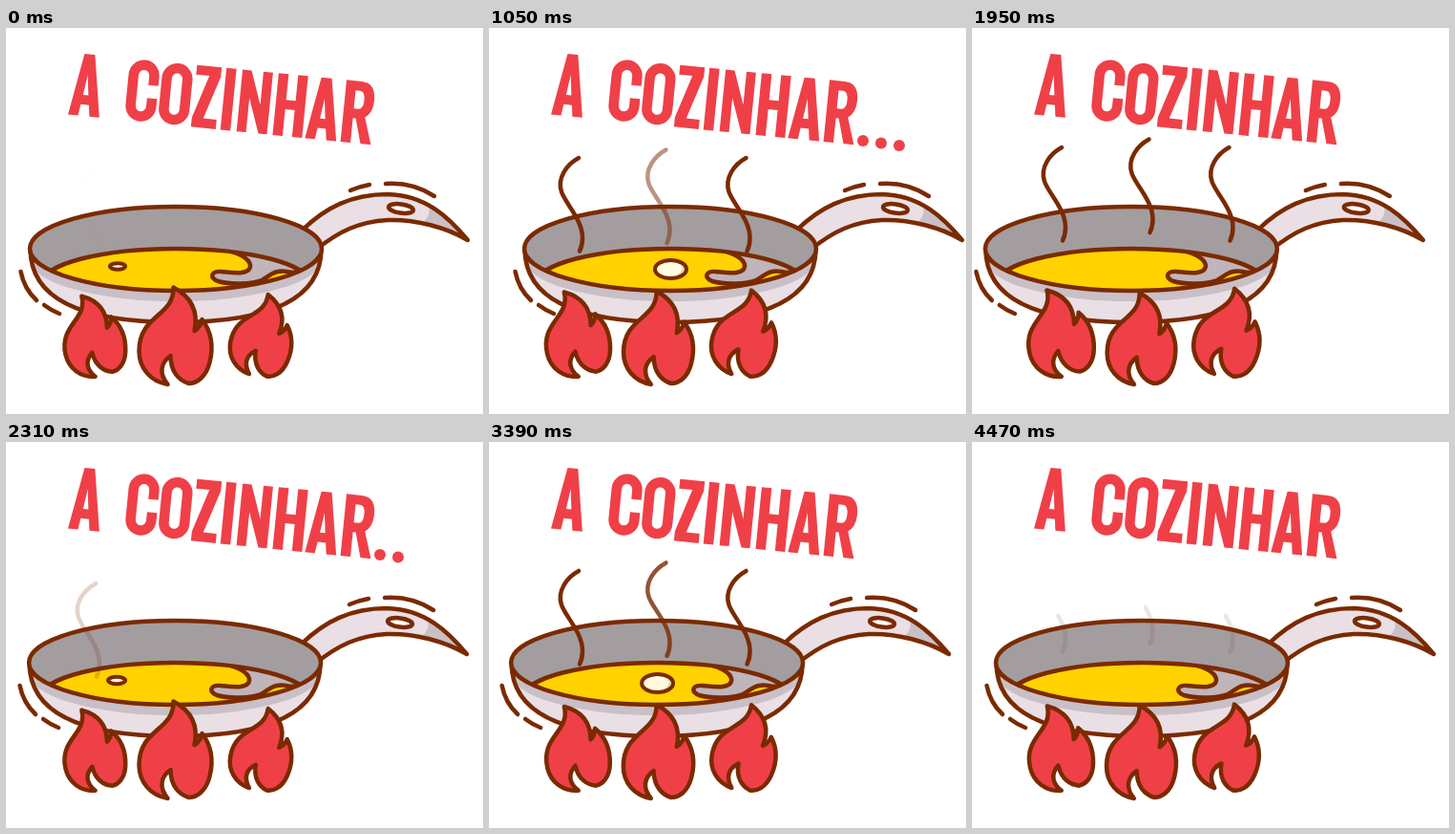
An HTML page for the animation above (4500 ms loop, 500 px wide and 404 px high).

```html
<!DOCTYPE html>
<html lang="pt">
<head>
<meta charset="utf-8">
<title>A cozinhar...</title>
<style>
html, body { margin: 0; width: 100%; height: 100%; overflow: hidden; background: #fff; }
svg { display: block; width: 100%; height: 100%; }
.line { stroke: #7b2a00; stroke-width: 4.5; stroke-linecap: round; stroke-linejoin: round; }
.none { fill: none; }
.red { fill: #ef4048; }
.light { fill: #e9dfe5; }
.shade { fill: #c9bfc6; }
.grey { fill: #a39da0; }
.pale { fill: #bfb5bb; }
.oil { fill: #ffd200; }
.stroke { fill: none; stroke: #ef4048; stroke-width: 10.5; }
</style>
</head>
<body>
<svg viewBox="0 0 500 404" role="img" aria-label="A COZINHAR...">
  <defs>
    <clipPath id="rim"><ellipse cx="178" cy="231" rx="153" ry="44"/></clipPath>
    <clipPath id="floor"><ellipse cx="178" cy="267" rx="140" ry="36"/></clipPath>
    <path id="bodyShape" d="M25.5 231C25.5 291 95 308 178 308S330.500 291 330.500 231Z"/>
    <clipPath id="body"><use href="#bodyShape"/></clipPath>
    <path id="handleShape" d="M311 211C335 188 362 174 400 174C440 175 464 198 484 222C462 209 430 200 400 201C370 203 350 212 325 232Z"/>
    <clipPath id="handle"><use href="#handleShape"/></clipPath>
  </defs>

  <!-- lettering -->
  <g class="red" fill-rule="evenodd" transform="translate(65 90.500) rotate(5.700)">
    <path id="capA" d="M0 0L11 -65H22L33 0H22.5L20.8 -12H12.2L10.5 0ZM13.7 -22H19.3L16.5 -43Z"/>
    <path class="stroke" transform="translate(59)" d="M27 -39V-48.5a10.85 11 0 0 0 -21.7 0V-16.5a10.85 11 0 0 0 21.7 0V-25.500"/>
    <path class="stroke" transform="translate(94)" d="M5.3 -48.5a10.85 11 0 0 1 21.7 0V-16.5a10.85 11 0 0 1 -21.7 0Z"/>
    <path transform="translate(129.5)" d="M0 -65H26V-55L12 -10H26V0H0V-10L14 -55H0Z"/>
    <path transform="translate(160.5)" d="M0 0V-65H10.5V0Z"/>
    <path transform="translate(177.5)" d="M0 0V-65H9.5L22 -30V-65H32V0H23L10 -36V0Z"/>
    <path transform="translate(215.5)" d="M0 0V-65H10.5V-38H20.5V-65H31V0H20.5V-28H10.5V0Z"/>
    <use href="#capA" x="249.5"/>
    <path transform="translate(287)" d="M0 0V-65H16Q31 -65 31 -46Q31 -33 23 -28L32 0H21L13.5 -26H10.5V0ZM10.5 -55V-36H15Q20.5 -36 20.5 -45.5T15 -55Z"/>
  </g>
  <g id="dots" class="red">
    <circle cx="392" cy="118" r="6"/>
    <circle cx="411" cy="120.5" r="6"/>
    <circle cx="430" cy="123" r="6"/>
  </g>

  <g id="pan">
    <path class="line none" d="M361 170Q370 166 381 164M398 163Q426 161 449 176M15.5 255Q19 273 32 285M40 290Q48 296 56 299"/>
    <use href="#handleShape" class="light"/>
    <path class="shade" clip-path="url(#handle)" d="M428 172Q456 190 434 206L490 230V180Z"/>
    <use href="#handleShape" class="line none"/>
    <ellipse class="line" fill="#fff" cx="414" cy="189" rx="13" ry="4.6" transform="rotate(8 414 189)"/>
    <use href="#bodyShape" class="light"/>
    <ellipse class="shade" cx="178" cy="242" rx="153" ry="44" clip-path="url(#body)"/>
    <use href="#bodyShape" class="line none"/>
    <ellipse class="grey" cx="178" cy="231" rx="153" ry="44"/>
    <g clip-path="url(#rim)">
      <g clip-path="url(#floor)">
        <rect class="oil" x="20" y="225" width="320" height="60"/>
        <path class="line pale" d="M222 230C240 234 257 240 256 250C254 259 236 256 226 255C215 254 213 261 222 265C236 269 258 268 268 264C277 260 280 251 300 256L345 250L310 220Z"/>
      </g>
      <ellipse class="line none" cx="178" cy="267" rx="140" ry="36"/>
    </g>
    <g id="bubbles"></g>
    <ellipse class="line none" cx="178" cy="231" rx="153" ry="44"/>
  </g>
  <g id="steam"></g>
  <g id="flames"></g>
</svg>
<script>
const LOOP = 4500, PUFF = 2250, DOTS = 1500;
const $ = id => document.getElementById(id);
const clamp = x => Math.min(1, Math.max(0, x));
const ramp = (t, a, b) => clamp((t - a) / (b - a));
const ease = u => u * u * (3 - 2 * u);
const mix = (a, b, u) => a + (b - a) * u;

function add(parent, tag, attrs) {
  const el = document.createElementNS("http://www.w3.org/2000/svg", tag);
  set(el, attrs);
  return parent.appendChild(el);
}
function set(el, attrs) {
  for (const k in attrs) el.setAttribute(k, attrs[k]);
}
function track(t, keys) {
  let i = 1;
  while (i < keys.length - 1 && t > keys[i][0]) i++;
  const [a, va] = keys[i - 1], [b, vb] = keys[i];
  return mix(va, vb, ease(ramp(t, a, b)));
}

const sway = [[0, 0], [300, 0], [1000, 12], [1372, 12], [1838, -12],
  [2838, 12], [3137, 12], [3603, -12.5], [4080, 0], [4500, 0]];
const flicker = [0, 296, 592, 864, 1192, 1480, 1817, 2064, 2310, 2595,
  2880, 3190, 3520, 3840, 4080, 4300, 4600].map((t, i) => [t, i % 2]);

const flameShape = "M-2 -50.5C14 -42 25 -28 20 -5C25 -8 27 -12 28 -17C38 -4 40 12 36 28" +
  "C32 44 22 50 14 50C4 47 -5 38 -5 21C-16 29 -17 40 -8 51" +
  "C-26 48 -38 34 -38 16C-38 -22 -1 -20 -2 -50.5Z";
const flames = [
  { x: 90.5, y: 364, tilt: -13, from: .84, to: .95 },
  { x: 177.5, y: 372.5, tilt: 0, from: 1, to: .9 },
  { x: 269, y: 363.5, tilt: 10, from: .84, to: .95 }
].map(f => ({ ...f, el: add($("flames"), "path", { class: "line red", d: flameShape }) }));

const steam = [
  { x: 0, y: 0, start: 0 },
  { x: 91.5, y: -8.5, start: 900 },
  { x: 175.5, y: 0, start: 450 }
].map(s => ({ ...s, el: add($("steam"), "path", {
  class: "line none", pathLength: 1,
  d: "M94 129.5C82 136 71 150 76 165C80 177 98 194 98 213C98 219 97 223 95 227"
}) }));

function addBubble(x, y) {
  const g = add($("bubbles"), "g", { transform: `translate(${x} ${y})` });
  const dark = add(g, "ellipse", { fill: "#ddd8b4" });
  const lit = add(g, "ellipse", { fill: "#fffbe0" });
  const edge = add(g, "ellipse", { class: "line none", style: "stroke-width:4" });
  return (on, rx, ry, dome) => {
    set(g, { visibility: on ? "visible" : "hidden" });
    for (const el of [dark, edge]) set(el, { rx, ry });
    set(lit, { rx: rx * (1 - .14 * dome), ry: ry * (1 - .1 * dome), cx: -rx * .14 * dome, cy: -ry * .1 * dome });
  };
}
const flatBubble = addBubble(117, 249.5);
const domeBubble = addBubble(178.5, 252.5);

function draw(t) {
  set($("pan"), { transform: `translate(${track(t, sway).toFixed(2)} 0)` });

  const p = track(t, flicker);
  for (const f of flames) {
    const s = mix(f.from, f.to, p);
    set(f.el, { transform: `translate(${f.x} ${f.y}) scale(${s}) translate(0 -50.5) rotate(${f.tilt})` });
    f.el.style.strokeWidth = 4.5 / s;
  }

  const dt = t % DOTS;
  [...$("dots").children].forEach((d, i) => {
    const a = 510 + i * 170;
    set(d, { opacity: dt < 1170 ? ramp(dt, a, a + 90) : 0 });
  });

  const ph = t % PUFF;
  const rise = (1590 - ph) * .0122;
  const cut = .83 * ramp(ph, 2120, 2250);
  for (const s of steam) {
    const o = ramp(ph, s.start, s.start + 300) * (1 - ramp(ph, 2000, 2250));
    set(s.el, {
      transform: `translate(${s.x} ${s.y + rise})`,
      opacity: o,
      visibility: o > 0 ? "visible" : "hidden",
      "stroke-dasharray": cut > 0 ? "1 2" : "none",
      "stroke-dashoffset": -cut
    });
  }

  const a = ramp(ph, 0, 60), b = ramp(ph, 60, 630);
  flatBubble(ph < 800, 8 + a + 3.5 * b, 3.2 + .5 * a + b, 0);
  const grow = ramp(ph, 420, 630), swell = ramp(ph, 630, 1050);
  domeBubble(ph >= 420 && ph < 1200, 5 + 6.5 * grow + 5 * swell, 2.5 + 4.5 * grow + 2.5 * swell, grow);
}

const t0 = performance.now();
function frame() {
  draw((performance.now() - t0) % LOOP);
  requestAnimationFrame(frame);
}
frame();
</script>
</body>
</html>
```
